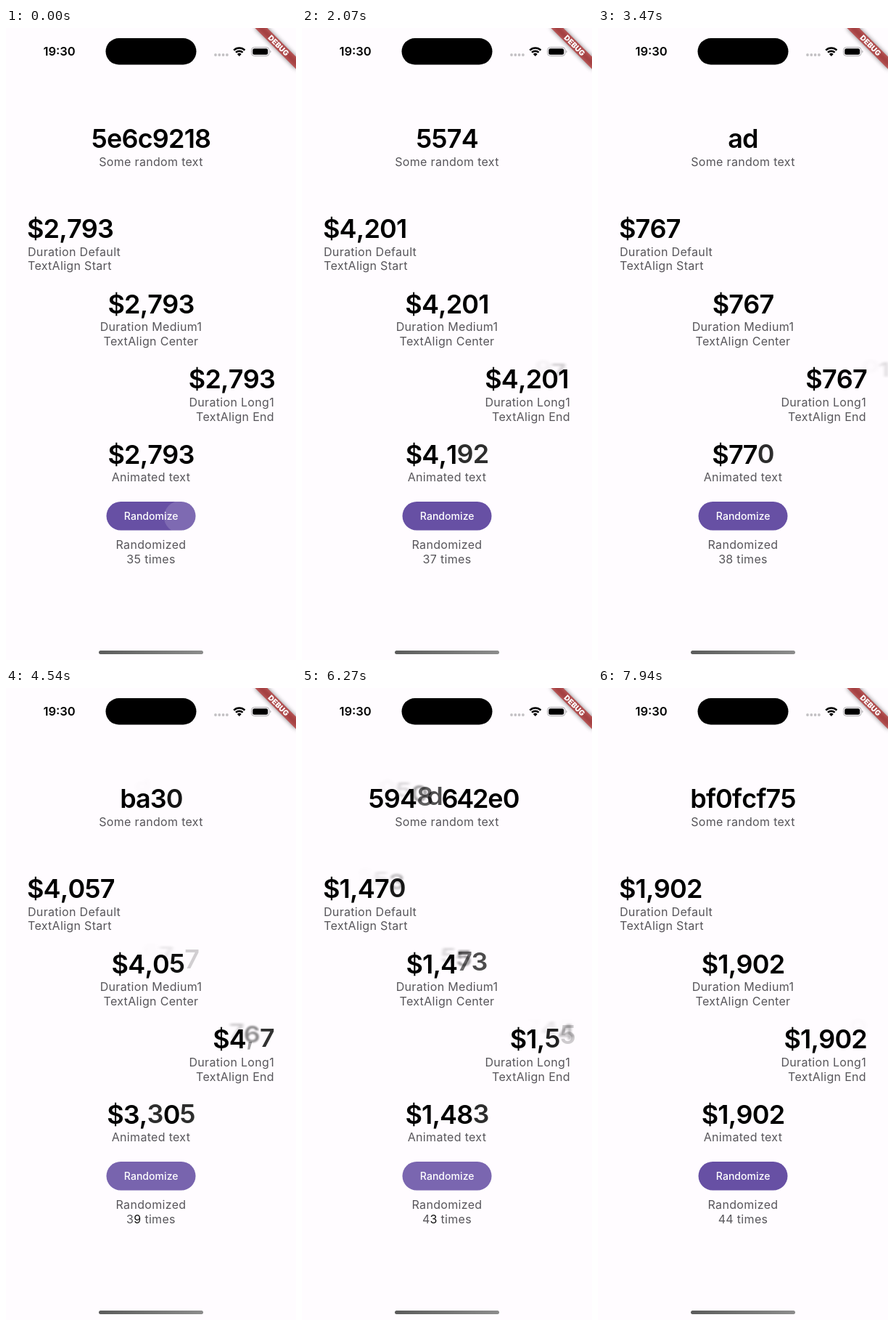
Animation of 400 by 870 pixels, one loop 8000 ms. Source, as an HTML page:

```html
<!DOCTYPE html>
<html lang="en">
<head>
<meta charset="utf-8">
<title>Animated text</title>
<style>
html, body { margin: 0; width: 100%; height: 100%; overflow: hidden; background: #fffcff; }
svg { display: block; width: 100%; height: 100%; }
text { font-family: Inter, sans-serif; white-space: pre; }
.big { font-size: 36px; font-weight: 600; fill: #000; }
.small { font-size: 16px; fill: #57555a; letter-spacing: .32px; }
.mid { text-anchor: middle; }
.end { text-anchor: end; }
</style>
</head>
<body>
<svg viewBox="0 0 400 870">
  <defs>
    <linearGradient id="bar"><stop stop-color="#5c5c5c"/><stop offset="1" stop-color="#8c8c8c"/></linearGradient>
    <clipPath id="pill"><rect x="138.5" y="652" width="123" height="39.5" rx="19.75"/></clipPath>
    <filter id="soft" x="-20%" y="-100%" width="140%" height="300%"><feGaussianBlur stdDeviation="3"/></filter>
  </defs>
  <rect width="400" height="870" fill="#fffcff"/>

  <text x="51.5" y="38.4" font-size="16.5" font-weight="600">19:30</text>
  <rect x="137.5" y="14" width="125" height="36.5" rx="18.25"/>
  <g fill="#c3c1c4">
    <circle cx="289" cy="37" r="1.9"/><circle cx="294.3" cy="37" r="1.9"/>
    <circle cx="299.6" cy="37" r="1.9"/><circle cx="304.9" cy="37" r="1.9"/>
  </g>
  <g fill="none" stroke="#000" stroke-width="2.5">
    <path d="M314.2 30.7a10.8 10.8 0 0 1 15.2 0M317 33.7a6.9 6.9 0 0 1 9.6 0"/>
  </g>
  <path d="M318.9 36a4.2 4.2 0 0 1 5.8 0L321.8 39Z"/>
  <rect x="338.5" y="26.5" width="24.5" height="12" rx="4" fill="none" stroke="#aaa8ab"/>
  <rect x="340.2" y="28.2" width="21" height="8.6" rx="2.5"/>
  <path d="M364.3 30.5q2.6 2 0 4z" fill="#aaa8ab"/>

  <text class="small mid" x="200" y="190">Some random text</text>
  <text class="small" x="30" y="313.5">Duration Default</text>
  <text class="small" x="30" y="333.3">TextAlign Start</text>
  <text class="small mid" x="200" y="417">Duration Medium1</text>
  <text class="small mid" x="200" y="437">TextAlign Center</text>
  <text class="small end" x="370" y="520.7">Duration Long1</text>
  <text class="small end" x="370" y="540.7">TextAlign End</text>
  <text class="small mid" x="200" y="624">Animated text</text>
  <text class="small mid" x="200" y="717">Randomized</text>

  <g clip-path="url(#pill)">
    <rect x="138" y="651" width="124" height="42" fill="#6750a4"/>
    <circle id="ripple" cx="240" cy="673" fill="#fff"/>
  </g>
  <text class="mid" x="200.2" y="676.8" font-size="14" font-weight="500" fill="#fff" letter-spacing=".05">Randomize</text>

  <g id="live"></g>

  <rect x="128" y="857" width="144" height="5" rx="2.5" fill="url(#bar)"/>
  <g transform="translate(400 0) rotate(45)">
    <rect x="-40" y="28" width="80" height="12" opacity=".5" filter="url(#soft)"/>
    <rect x="-42" y="28" width="84" height="12" fill="#b71c1c" fill-opacity=".63"/>
    <text class="mid" y="37.7" font-size="10.2" font-weight="900" fill="#fff">DEBUG</text>
  </g>
</svg>
<script>
const LOOP = 8000, COUNT_MS = 800;
const taps = [
  [-9000, '5e6c9218', 2793], [10, '5b', 1597], [1390, '5574', 4201],
  [2755, 'ad', 767], [4230.1, 'ba30', 4057], [5440, 'c41f', 820],
  [5620, '7fd5d642e0', 744], [5800, '1050d642e0', 1553],
  [5985, '5948b1c37a', 1470], [7120, 'bf0fcf75', 1902]
].map(([at, id, sum]) => ({ at, id, sum }));

const money = n => '$' + Math.floor(n + 1e-6).toLocaleString('en-US');
const ids = taps.map(p => p.id);
const sums = taps.map(p => money(p.sum));
const counts = taps.map((p, k) => `${35 + k} times`);

const BIG = { cls: 'big', size: 36, font: '600 36px Inter, sans-serif', gap: -.8 };
const SMALL = { cls: 'small', size: 16, font: '400 16px Inter, sans-serif', gap: .32 };
const fields = [
  { texts: ids, ms: 300, style: BIG, x: 200, align: .5, y: 165.3 },
  { texts: sums, ms: 200, style: BIG, x: 29, align: 0, y: 288.8 },
  { texts: sums, ms: 250, style: BIG, x: 200, align: .5, y: 392.5 },
  { texts: sums, ms: 450, style: BIG, x: 371, align: 1, y: 496 },
  { texts: counts, ms: 200, style: SMALL, x: 200, align: .5, y: 737 }
];

const clamp = x => Math.min(1, Math.max(0, x));
const smooth = x => (x = clamp(x), x * x * (3 - 2 * x));
const mix = (a, b, p) => a + (b - a) * p;
const live = document.getElementById('live');
const ripple = document.getElementById('ripple');
const pen = document.createElement('canvas').getContext('2d');
const widths = {};

function advance(c, style) {
  const key = style.cls + c;
  if (!(key in widths)) {
    pen.font = style.font;
    widths[key] = pen.measureText(c).width + style.gap;
  }
  return widths[key];
}

const textWidth = (s, style) => [...s].reduce((w, c) => w + advance(c, style), 0);
const offset = (s, i, style) => textWidth(s.slice(0, i), style);

function glyph(c, style, x, y, o = {}) {
  const { alpha = 1, rise = 0, squash = 1, blur = 0, ink = '' } = o;
  if (alpha < .01 || c === ' ') return '';
  const mid = style.size * .36;
  const css = (blur ? `filter:blur(${blur.toFixed(2)}px);` : '') + (ink && `fill:${ink}`);
  return `<text class="${style.cls}" opacity="${alpha.toFixed(3)}" style="${css}" y="${mid}" ` +
    `transform="translate(${x.toFixed(2)} ${(y - rise - mid).toFixed(2)}) scale(1 ${squash.toFixed(3)})">${c}</text>`;
}

// Each character leaves upward while its successor fades in, staggered by index.
function roll({ texts, ms, style, x, align, y }, t, last) {
  const first = Math.max(0, last - 3);
  const step = (k, i) => clamp((t - taps[k].at - i * ms * .2) / ms);
  const cell = (k, i) => {
    const c = texts[k][i], own = c ? advance(c, style) : 0;
    if (k === first) return own;
    const shared = c && texts[k - 1][i], p = step(k, i);
    return mix(cell(k - 1, i), own, smooth((p - (shared ? .3 : 0)) / .5));
  };
  let total = 0;
  for (let i = 0; i < 10; i++) total += cell(last, i);
  const left = x - total * align;

  let out = '';
  for (let k = first; k <= last; k++) {
    [...texts[k]].forEach((c, i) => {
      if (k < last && texts[k + 1][i] === c) return;
      const gone = k < last ? step(k + 1, i) : 0;
      const kept = k > first && texts[k - 1][i] === c;
      const p = k > first ? step(k, i) : 1;
      const shown = kept ? 1 : smooth((p - .15) / .35);
      let pos = offset(texts[k], i, style);
      if (kept) pos = mix(offset(texts[k - 1], i, style), pos, smooth(p));
      const fresh = style === SMALL && !kept && t - taps[k].at < 600;
      out += glyph(c, style, left + pos, y, {
        alpha: shown * (1 - gone) ** 2.3,
        rise: style.size * (.6 * gone + .22 * (1 - shown)),
        squash: 1 - .45 * gone,
        blur: 4 * gone * style.size / 36,
        ink: fresh ? '#111' : ''
      });
    });
  }
  return out;
}

function valueAt(t) {
  let v = taps[0].sum;
  for (let k = 1; k < taps.length && taps[k].at < t; k++) {
    const end = k + 1 < taps.length ? Math.min(t, taps[k + 1].at) : t;
    const p = clamp((end - taps[k].at) / COUNT_MS);
    v = mix(v, taps[k].sum, 1 - (1 - p) ** 3);
  }
  return v;
}

function counter(t, last) {
  const now = valueAt(t), text = money(now), before = money(valueAt(t - 20));
  const settling = Math.abs(now - taps[last].sum) < 1;
  let x = 200 - textWidth(text, BIG) / 2, out = '';
  [...text].forEach((c, i) => {
    const moved = before[i] !== c;
    if (moved && settling && before[i])
      out += glyph(before[i], BIG, x, 599.5, { alpha: .35, rise: 4, blur: 1 });
    out += glyph(c, BIG, x, 599.5, moved ? { alpha: .82, rise: settling ? 2 : .5 } : {});
    x += advance(c, BIG);
  });
  return out;
}

function press(t) {
  const tap = taps.filter(p => p.at - 30 <= t).pop();
  const age = t - tap.at + 30;
  ripple.setAttribute('r', Math.min(130, 18 + age * .15 + age * age * .002));
  ripple.setAttribute('opacity', .15 * (1 - smooth((age - 230) / 350)));
}

function draw(t) {
  const last = taps.filter(p => p.at <= t).length - 1;
  live.innerHTML = fields.map(f => roll(f, t, last)).join('') + counter(t, last);
  press(t);
}

const start = performance.now();
function tick() {
  draw((performance.now() - start) % LOOP);
  requestAnimationFrame(tick);
}
tick();
</script>
</body>
</html>
```
